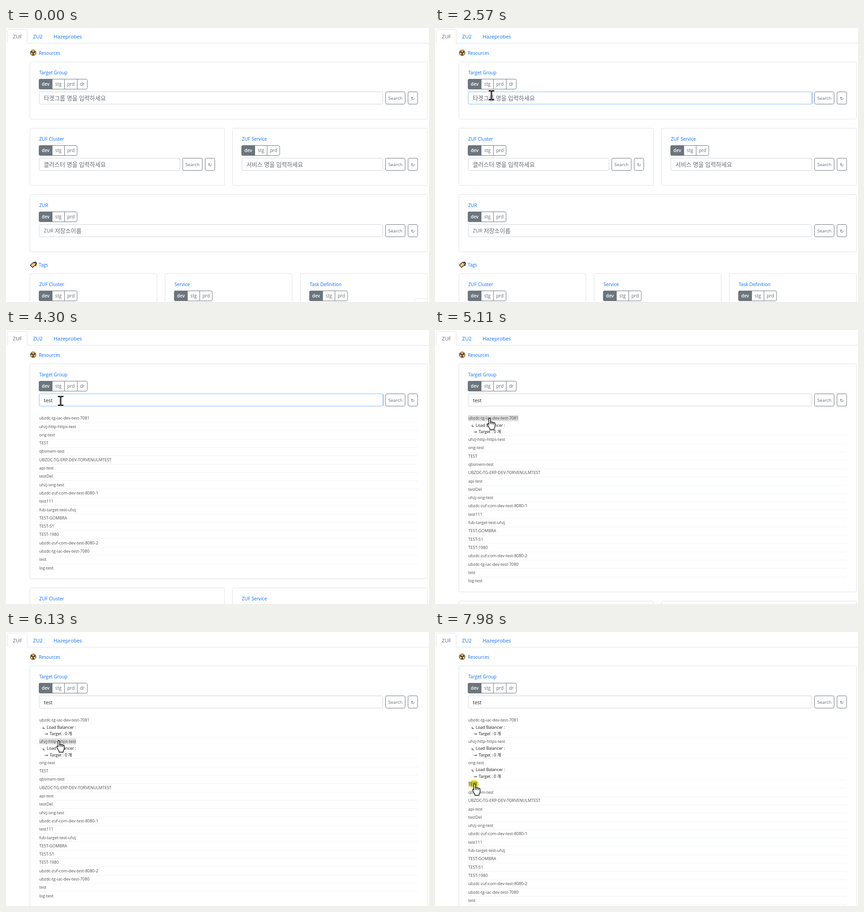
Animation, 929 px wide and 603 px high, one loop 8 s. Source, as an HTML page:

```html
<!DOCTYPE html>
<html lang="ko">
<head>
<meta charset="utf-8">
<title>Resource search</title>
<style>
html, body { margin: 0; width: 100%; height: 100%; overflow: hidden; background: #fff; }
svg { display: block; }
text { font: 10px "Open Sans", "Noto Sans CJK KR", sans-serif; fill: #636b73; }
.link { fill: #0d6efd; }
.mid { text-anchor: middle; }
.card, .tab { fill: none; stroke: #dee2e6; }
.field { fill: #fff; stroke: #ced4da; }
.btn { fill: none; stroke: #6c757d; }
.on { fill: #6c757d; stroke: #6c757d; }
.on + text { fill: #fff; font-weight: 600; }
.glyph { font-family: "DejaVu Sans", sans-serif; }
.row, .note { font-size: 9px; fill: #4c4c4c; }
.note { fill: #111; }
.rule { stroke: #eff1f3; shape-rendering: crispEdges; }
.hover { fill: #dcdcdc; }
.cursor { fill: #fff; stroke: #000; stroke-width: 1.3; stroke-linejoin: round; }
#pulse { fill: #f3ee38; mix-blend-mode: multiply; }
</style>
</head>
<body>
<svg id="stage" width="929" height="603" viewBox="0 0 929 603"></svg>
<script>
const LOOP = 8000, TICK = 200 / 3;
const ROW_TOP = 194, PITCH = 18.3, NOTE_H = 28.5, LIST_H = 347;
const names = [
  "ubzdc-tg-iac-dev-test-7081", "uhzj-http-https-test", "ong-test", "TEST", "qbsmem-test",
  "UBZDC-TG-ERP-DEV-TORVENULMTEST", "api-test", "testDel", "uhzj-ong-test",
  "ubzdc-zuf-com-dev-test-8080-1", "test111", "fub-target-test-uhzj", "TEST-GOMBRA",
  "TEST-S1", "TEST-1980", "ubzdc-zuf-com-dev-test-8080-2", "ubzdc-tg-iac-dev-test-7080",
  "test", "log-test"
];

// Markup helpers
const text = (x, y, s, cls = "", size = "") =>
  `<text x="${x}" y="${y}" class="${cls}"${size && ` style="font-size:${size}px"`}>${s}</text>`;
const box = (x, y, w, h, cls, r = 3, id = "") =>
  `<rect x="${x}" y="${y}" width="${w}" height="${h}" rx="${r}" class="${cls}"${id && ` id="${id}"`}/>`;

function stages(x, y, labels) {
  const edge = i => i && Math.min(2 + 27.2 * i, 106);
  return box(x, y, edge(labels.length), 22, "btn") + labels.map((s, i) => {
    const left = x + Math.round(edge(i)), right = x + Math.round(edge(i + 1));
    const mark = i ? `<path d="M${left} ${y}v22" class="btn"/>`
      : `<path d="M${right} ${y}v22h-26q-3 0 -3-3v-16q0-3 3-3z" class="on"/>`;
    return mark + text((left + right) / 2, y + 14, s, "mid");
  }).join("");
}

function card(x, y, right, title, hint, opt = {}) {
  const inner = x + 20.5, top = y + 66;
  const head = box(x, y, right - x, 126, "card", 3, opt.id) + text(inner, y + 27, title, "link", 10.2) +
    stages(inner - .5, y + 38, opt.labels || ["dev", "stg", "prd"]);
  if (!hint) return head;
  return head + box(inner, top, right - 98 - inner, 27, "field", 3, opt.id && "field") +
    `<g${opt.id ? ' id="hint"' : ""}>${hint(inner + 10, top + 18)}</g>` +
    box(right - 92, top, 43, 27, "btn") + text(right - 70.5, top + 17, "Search", "mid", 9.8) +
    box(right - 42.5, top, 21, 27, "btn") + text(right - 32, top + 18, "↻", "mid glyph", 10.5);
}

const korean = s => (x, y) => text(x, y, s, "", 12.8);
const repoHint = (x, y) => text(x, y - .5, "ZUR", "", 11) + korean("저장소이름")(x + 24, y);

const wedge = a => `<path d="M-1.9 -4.3A4.7 4.7 0 0 1 1.9 -4.3L.6 -1.2H-.6z" transform="rotate(${a})"/>`;
const hazard = `<g transform="translate(59.6 54.5)"><circle r="6.2" fill="#fcc56b" stroke="#111"/>
  ${[60, 180, 300].map(wedge).join("")}<circle r="1"/></g>`;
const label = `<g transform="translate(59.5 521)" stroke="#222" stroke-linejoin="round">
  <path d="M-6 1L1 -5.5L5.5 -5L5.5 0L-1 6z" fill="#fcc56b" stroke-width="1.2"/>
  <path d="M2.5 -2.8Q3 -7 6 -5.5T5.5 3" fill="none" stroke-width="1.6"/></g>`;

const listRow = (s, i) => {
  const y = ROW_TOP + i * PITCH;
  return `<g class="item">${box(73, y - 6.5, 0, 13, "hover", 0)}${text(73, y + 3.2, s, "row")}
    <g class="notes"><path d="M81.5 ${y + 14.5}v4h4" fill="none" stroke="#222"/>
      ${text(89.5, y + 18.6, "Load Balancer :", "note")}${text(84.5, y + 33.4, "→", "note glyph")}
      ${text(96, y + 33.4, "Target : 0 개", "note")}</g>
    ${i < names.length - 1 ? `<path class="rule" d="M73 ${y + 9.5}H904"/>` : ""}</g>`;
};

// Arrow, text beam, hand
const cursors = [
  `<path d="M.7 .8V25.2L6.2 20L10.3 29.6L14.4 27.8L10.3 18.4H17.8z"/>`,
  `<path d="M-6.5 -11.5H-1.5L0 -10.5L1.5 -11.5H6.5V-8H2V8H6.5V11.5H1.5L0 10.5L-1.5 11.5H-6.5V8H-2V-8H-6.5z"
     style="fill:#111;stroke:#fff;stroke-width:.8"/><path d="M0 -9V9" style="stroke:#999;stroke-width:.8"/>`,
  `<path d="M-.8 13V1Q-.8 -1 1 -1T2.8 1V7.5Q4.8 6 6.2 8.2Q8.2 6.8 9.6 9Q12.8 8 13 11.5V16
     Q13 19 10.8 21.5V24.5H1.5V22Q0 20.5 -1.5 17.5L-3.5 13.5Q-4 11.2 -2.4 11.2T-.8 13z"/>
   <path d="M2.8 7.5V12M6.2 8.2V12.5M9.6 9V13" fill="none"/>`
];

const stage = document.getElementById("stage");
stage.innerHTML = `
  <path class="tab" d="M2.5 33V6.5q0-4 4-4h36q4 0 4 4V33.5H929"/>
  ${text(15, 23, "ZUF", "", 11.2)}${text(59.5, 23, "ZU2", "link", 11.2)}${text(104.5, 23, "Hazeprobes", "link", 11.2)}
  ${hazard}${text(72, 58.5, "Resources", "link", 9.9)}
  ${card(52.5, 74.5, 925.5, "Target Group", korean("타겟그룹 명을 입력하세요"), { id: "main", labels: ["dev", "stg", "prd", "dr"] })}
  <rect id="ring" x="828" y="140" width="2.6" height="28" fill="#c2dbfe"/>
  <text id="typed" x="83" y="158.8" style="font-size:11px;fill:#212529"></text>
  <rect id="caret" y="147" width="1" height="15"/>
  <g id="list">${names.map(listRow).join("")}</g>
  <g id="below">
    ${card(52.5, 220.5, 480, "ZUF Cluster", korean("클러스터 명을 입력하세요"))}
    ${card(497.5, 220.5, 925.5, "ZUF Service", korean("서비스 명을 입력하세요"))}
    ${card(52.5, 366.5, 925.5, "ZUR", repoHint)}
    ${label}${text(72, 525, "Tags", "link", 9.9)}
    ${["ZUF Cluster", "Service", "Task Definition"].map((s, i) =>
      card(52.5 + i * 297, 540.5, 331.5 + i * 297, s)).join("")}
  </g>
  <path id="corner" d="M897.5 603V595.5H925" fill="#fff" stroke="#e6e8ea"/>
  <circle id="pulse" r="10"/>
  ${cursors.map(c => `<g class="cursor">${c}</g>`).join("")}`;

const $ = id => document.getElementById(id);
const show = (el, on) => el.setAttribute("visibility", on ? "visible" : "hidden");
const move = (el, x, y) => el.setAttribute("transform", `translate(${x} ${y})`);
const pointers = stage.querySelectorAll(".cursor");
const items = [...stage.querySelectorAll(".item")].map(g => ({
  g, hover: g.querySelector(".hover"), label: g.querySelector(".row"),
  notes: g.querySelector(".notes"), rule: g.querySelector(".rule")
}));

// Pointer moves: the first one swings in along a curve, the rest are straight
const moves = [
  { from: 460, to: 1370, x: 130, y: 148, bend: { x: 250, y: -170 } },
  { from: 1740, to: 1800, x: 129, y: 153 },
  { from: 2500, to: 2550, x: 124, y: 148 },
  { from: 4100, to: 4260, x: 120, y: 156 },
  { from: 4360, to: 4830, x: 119, y: 195 },
  { from: 5330, to: 5690, x: 115, y: 240 },
  { from: 6400, to: 6690, x: 98, y: 287 },
  { from: 7440, to: 7940, x: 86, y: 335 }
];
const [fieldClick, ...rowClicks] = [1890, 4910, 5870, 6960, 7960];
const keys = [3030, 3090, 3290, 3560];
const SEARCHED = 4100, RELEASE = 80, PULSE = 140, BLINK = 530;

const ease = k => k * k * (3 - 2 * k);
const mix = (a, b, k) => a + (b - a) * k;

function pointerAt(t) {
  const q = Math.floor((t + 30) / TICK) * TICK;
  let p = { x: 884, y: 600 };
  for (const m of moves) {
    if (q < m.from) break;
    const k = ease(Math.min(1, (q - m.from) / (m.to - m.from)));
    const bend = m.bend || { x: (p.x + m.x) / 2, y: (p.y + m.y) / 2 };
    const along = c => mix(mix(p[c], bend[c], k), mix(bend[c], m[c], k), k);
    p = { x: along("x"), y: along("y") };
  }
  p.shape = t < moves[1].to ? 0 : p.y < 180 ? 1 : 2;
  p.shown = q >= moves[0].from;
  return p;
}

function drawField(t) {
  const focusAt = fieldClick + RELEASE;
  const focused = t >= focusAt && t < rowClicks[0];
  const count = keys.filter(k => t >= k).length;
  const since = t - (count ? keys[count - 1] : focusAt);
  $("field").style.stroke = focused ? "#86b7fe" : "";
  show($("ring"), focused);
  show($("hint"), !count);
  $("typed").textContent = "test".slice(0, count);
  $("caret").setAttribute("x", 83 + (count ? $("typed").getComputedTextLength() : 0));
  show($("caret"), focused && since % (2 * BLINK) < BLINK);
}

function drawList(t, p) {
  const listed = t >= SEARCHED;
  let shift = 0;
  $("list").style.display = listed ? "" : "none";
  items.forEach((it, i) => {
    const open = t >= rowClicks[i] + RELEASE;
    const hot = p.shape === 2 && Math.abs(p.y - ROW_TOP - i * PITCH - shift) < 7;
    move(it.g, 0, shift);
    it.notes.style.display = open ? "" : "none";
    it.hover.setAttribute("width", listed && hot ? it.label.getComputedTextLength() : 0);
    if (it.rule) move(it.rule, 0, open ? NOTE_H : 0);
    if (open) shift += NOTE_H;
  });
  const grow = listed ? Math.round(LIST_H + shift) : 0;
  $("main").setAttribute("height", 126 + grow);
  move($("below"), 0, grow);
}

function render(t) {
  const p = pointerAt(t);
  show($("corner"), t < 70);
  drawField(t);
  drawList(t, p);
  pointers.forEach((el, i) => {
    show(el, p.shown && p.shape === i);
    move(el, p.x, p.y);
  });
  show($("pulse"), [fieldClick, ...rowClicks].some(c => t >= c && t < c + PULSE));
  move($("pulse"), p.x, p.y);
}

const start = performance.now();
function loop() {
  render((performance.now() - start) % LOOP);
  requestAnimationFrame(loop);
}
loop();
</script>
</body>
</html>
```
